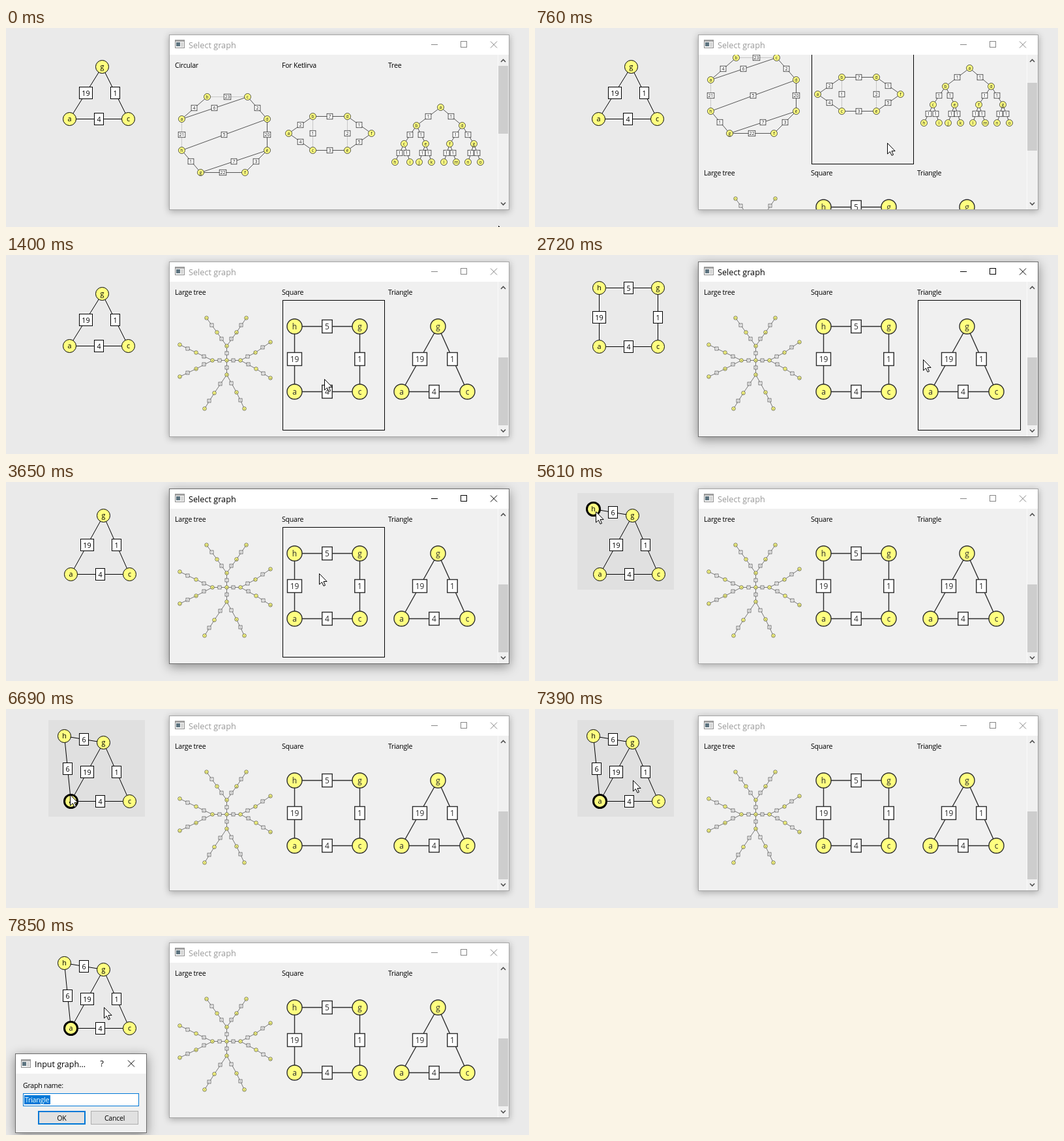
Write an HTML page with a canvas that moves like this. It is 802 px wide and 305 px high and loops after 7990 ms.

```html
<!DOCTYPE html>
<html lang="en">
<head>
<meta charset="utf-8">
<title>Select graph</title>
<style>
html, body { margin: 0; width: 100%; height: 100%; overflow: hidden; background: #eaeaea; }
canvas { display: block; }
</style>
</head>
<body>
<canvas id="stage" width="802" height="305"></canvas>
<script>
const ctx = document.getElementById('stage').getContext('2d');
const LOOP = 7990, TICK = 77.75;
const SANS = '"Open Sans", "Noto Sans", sans-serif';
const BLUE = '#0078d7';

// Edges are written as "from, to, weight"
const graph = (nodes, edges, style) => ({ nodes, edges: edges.split(' '), style });
const MAIN = { r: 10, font: 10.8, lw: 1, ink: '#000', w: 8, digit: 6, h: 18 };
const LARGE = { r: 11.5, font: 12, lw: 1.4, ink: '#2c2c2c', w: 9, digit: 6.5, h: 20 };
const SMALL = { r: 5, font: 7, lw: .75, ink: '#222', w: 7, digit: 1.8, h: 8.5 };
const TINY = { r: 2.8, font: 4, lw: .7, ink: '#444', w: 3.5, digit: 1.5, h: 5 };

const TRI = 'ga19 gc1 ac4', SQ = 'hg5 ha19 gc1 ac4';
const mainGraphs = {
  start: graph({ g: [147, 59], a: [97, 139], c: [187, 139] }, TRI, MAIN),
  square: graph({ h: [98, 50], g: [188, 50], a: [98, 140], c: [188, 140] }, SQ, MAIN),
  triangle: graph({ g: [149, 51], a: [99, 141], c: [189, 141] }, TRI, MAIN),
  added: graph({ g: [149, 51], a: [99, 141], c: [189, 141], h: [89, 41] }, TRI + ' gh6', MAIN),
  joined: graph({ g: [149, 51], a: [99, 141], c: [189, 141], h: [89, 41] }, TRI + ' gh6 ha6', MAIN)
};

function binaryTree() {
  const nodes = {
    a: [666, 121], b: [629, 149], d: [699, 149],
    c: [610, 177], e: [643, 177], f: [680, 177], g: [717, 177]
  };
  [596, 619, 633, 652, 671, 690, 708, 727].forEach((x, i) => nodes['hijklmno'[i]] = [x, 205]);
  return graph(nodes, 'ab1 ad1 bc1 be1 df1 dg1 ch1 ci1 ej1 ek1 fl1 fm1 gn1 go1', SMALL);
}

function starTree() {
  const nodes = {
    a: [338, 161], b: [338, 139], c: [359, 161], d: [338, 183], e: [316, 161],
    f: [323, 118], g: [353, 118], h: [382, 149], i: [383, 174],
    j: [319, 211], k: [353, 210], l: [291, 149], m: [291, 174],
    n: [307, 96], o: [368, 96], p: [405, 133], q: [405, 188],
    r: [304, 235], s: [365, 235], t: [266, 137], u: [266, 186]
  };
  const pairs = 'ab ac ad ae bf bg ch ci dj dk el em fn go hp iq jr ks lt mu';
  return graph(nodes, pairs.split(' ').map((p, i) => p + (i % 3 + 1)).join(' '), TINY);
}

const cells = [
  [
    { name: 'Circular', g: graph({
      a: [269, 139], b: [308, 105], c: [370, 105], d: [400, 139],
      e: [400, 187], f: [366, 221], g: [298, 221], h: [269, 187]
    }, 'ab4 ac6 bc23 cd2 ah21 dh5 de20 ef3 eg7 gf22 hg1', SMALL), faint: 'bc ah' },
    { name: 'For Ketlirva', g: graph({
      a: [433, 161], b: [470, 135], d: [523, 135],
      f: [560, 161], c: [470, 187], e: [523, 187]
    }, 'ab2 bd7 df1 ac4 bc1 de2 ce3 ef5', SMALL), faint: 'bc de' },
    { name: 'Tree', g: binaryTree() }
  ],
  [
    { name: 'Large tree', g: starTree() },
    { name: 'Square', g: graph({ h: [442, 109], g: [542, 109], a: [442, 209], c: [542, 209] }, SQ, LARGE) },
    { name: 'Triangle', g: graph({ g: [662, 109], a: [606, 209], c: [707, 209] }, TRI, LARGE) }
  ]
];
const COL_X = [260, 424, 587], ROW_H = 225;

// Pointer path: tick, x, y
const path = [
  [0, 755, 303], [1, 700, 265], [2, 600, 212], [3, 545, 184], [6, 545, 184], [8, 540, 176],
  [15, 540, 176], [18, 488, 190], [19, 488, 190], [22, 491, 164], [31, 491, 164],
  [35, 595, 160], [41, 670, 160], [43, 669, 161], [44, 669, 161], [47, 480, 140],
  [50, 210, 105], [52, 83, 75], [54, 149, 41], [55, 161, 46], [57, 161, 46],
  [58, 159, 53], [60, 150, 53], [64, 149, 53], [68, 93, 45], [73, 93, 45],
  [76, 112, 62], [78, 137, 95], [80, 120, 118], [82, 99, 128], [85, 99, 128],
  [86, 98, 131], [88, 84, 112], [90, 100, 68], [91, 120, 49], [93, 148, 82], [95, 150, 109]
];

function pointer(k) {
  const i = path.findIndex(p => p[0] > k);
  if (i < 0) return path[path.length - 1].slice(1);
  const [k0, x0, y0] = path[i - 1], [k1, x1, y1] = path[i];
  const f = (k - k0) / (k1 - k0);
  return [Math.round(x0 + (x1 - x0) * f), Math.round(y0 + (y1 - y0) * f)];
}

const scrollAt = k => k < 10 ? 0 : k < 14 ? Math.min(k - 9, 3) * 60 : ROW_H;

function mainState(k) {
  if (k < 25) return [mainGraphs.start];
  if (k < 43) return [mainGraphs.square];
  if (k < 71) return [mainGraphs.triangle, k >= 61 ? 'g' : ''];
  if (k < 83) return [mainGraphs.added, 'h'];
  return [mainGraphs.joined, 'a'];
}

function rect(x, y, w, h, fill, stroke, lw = 1) {
  if (fill) { ctx.fillStyle = fill; ctx.fillRect(x, y, w, h); }
  if (stroke) {
    ctx.strokeStyle = stroke;
    ctx.lineWidth = lw;
    ctx.strokeRect(x + lw / 2, y + lw / 2, w - lw, h - lw);
  }
}

function line(pts, color, lw = 1) {
  ctx.beginPath();
  pts.forEach(([x, y]) => ctx.lineTo(x, y));
  ctx.strokeStyle = color;
  ctx.lineWidth = lw;
  ctx.stroke();
}

function text(s, x, y, size, color = '#000', align = 'left', gap = 0) {
  ctx.font = `${size}px ${SANS}`;
  ctx.letterSpacing = gap + 'px';
  ctx.textAlign = align;
  ctx.fillStyle = color;
  ctx.fillText(s, x, y);
}
const label = (s, x, y, color, align) => text(s, x, y, 10.6, color, align, -.25);

function drawGraph({ nodes, edges, style: s }, picked = '', faint = '') {
  ctx.save();
  ctx.translate(.5, .5);
  for (const e of edges) {
    const dim = faint.includes(e.slice(0, 2));
    line([nodes[e[0]], nodes[e[1]]], dim ? '#bbb' : s.ink, s.lw);
  }
  for (const e of edges) {
    const [x0, y0] = nodes[e[0]], [x1, y1] = nodes[e[1]], weight = e.slice(2);
    const x = Math.floor((x0 + x1) / 2), y = Math.floor((y0 + y1) / 2);
    const w = s.w + s.digit * weight.length;
    ctx.fillStyle = '#fff';
    ctx.strokeStyle = s.ink;
    ctx.lineWidth = s.lw;
    ctx.fillRect(x - w / 2, y - s.h / 2, w, s.h);
    ctx.strokeRect(x - w / 2, y - s.h / 2, w, s.h);
    text(weight, x, y + s.font * .38, s.font, s.ink, 'center');
  }
  for (const id in nodes) {
    const [x, y] = nodes[id];
    ctx.beginPath();
    ctx.arc(x, y, s.r, 0, 7);
    ctx.fillStyle = '#ffff80';
    ctx.strokeStyle = s.ink;
    ctx.lineWidth = id === picked ? 3 : s.lw;
    ctx.fill();
    ctx.stroke();
    text(id, x, y + s.font * .36, s.font, s.ink, 'center');
  }
  ctx.restore();
}

function frame(x, y, w, h, active) {
  ctx.save();
  ctx.shadowColor = `rgba(0,0,0,${active ? .42 : .3})`;
  ctx.shadowBlur = active ? 16 : 10;
  ctx.shadowOffsetY = active ? 4 : 2;
  rect(x, y, w, h, '#f0f0f0');
  ctx.restore();
  rect(x, y, w, 31, '#fff');
  rect(x, y, w, h, null, active ? '#6c6c6c' : '#a6a6a6');
}

function appIcon(x, y) {
  rect(x, y, 15, 13, '#f4f4f4', '#8f8f8f');
  rect(x + 1, y + 1, 13, 2, '#a9a9a9');
  rect(x + 2, y + 4, 6, 6, '#5d7480');
  rect(x + 9, y + 4, 4, 7, '#d6d6d6');
}

function cross(x, y, color) {
  line([[x, y], [x + 10, y + 10]], color);
  line([[x + 10, y], [x, y + 10]], color);
}

function drawPicker(k, [px, py]) {
  const active = k >= 24 && k < 53, scroll = scrollAt(k);
  frame(250, 10, 522, 269, active);
  appIcon(259, 18);
  const ink = active ? '#000' : '#858585';
  text('Select graph', 280, 31, 12.7, active ? '#000' : '#999');
  line([[652, 25.5], [662, 25.5]], ink);
  rect(697, 20, 10, 10, null, ink);
  cross(743, 20.5, ink);

  ctx.save();
  ctx.beginPath();
  ctx.rect(251, 41, 520, 237);
  ctx.clip();
  ctx.translate(0, -scroll);
  const hoverRow = k < 16 ? 0 : 1;
  cells.forEach((row, r) => {
    ctx.save();
    ctx.translate(0, r * ROW_H);
    row.forEach((cell, c) => {
      label(cell.name, COL_X[c] - 1, 61);
      drawGraph(cell.g, '', cell.faint);
      const x = COL_X[c], w = c === 1 ? 157 : 158;
      const inside = px >= x && px < x + w && py >= 69 && py < 269;
      if (r === hoverRow && inside) rect(x, 69, w, 200, null, '#000');
    });
    ctx.restore();
  });
  ctx.restore();

  rect(754, 41, 1, 237, '#fafafa');
  rect(755, 41, 16, 237, '#f0f0f0');
  rect(755, 58 + Math.round(scroll * .44), 15, 104, '#cdcdcd');
  line([[759, 52], [762.5, 48.5], [766, 52]], '#505050', 1.6);
  line([[759, 267.5], [762.5, 271], [766, 267.5]], '#505050', 1.6);
}

function drawMain(k) {
  const [g, picked] = mainState(k);
  if (k >= 51 && k < 97) {
    const pts = Object.values(g.nodes);
    const xs = pts.map(p => p[0]), ys = pts.map(p => p[1]);
    const x = Math.min(...xs) - 24, y = Math.min(...ys) - 24;
    rect(x, y, Math.max(...xs) + 24 - x, Math.max(...ys) + 24 - y, '#e0e0e0');
  }
  drawGraph(g, picked);
}

function button(s, x, main) {
  rect(x, 268, 73, 21, '#e1e1e1', main ? BLUE : '#adadad', main ? 2 : 1);
  label(s, x + 36.5, 283, '#000', 'center');
}

function drawDialog(k) {
  if (k < 98) return;
  const p = Math.min(1, (k - 97) / 4), s = .9 + .1 * p;
  ctx.save();
  ctx.globalAlpha = p;
  ctx.translate(115, 241);
  ctx.scale(s, s);
  ctx.translate(-115, -241);
  frame(14, 180, 202, 122, true);
  appIcon(23, 189);
  text('Input graph...', 44, 201, 12.5);
  text('?', 147, 200, 13, '#000', 'center');
  cross(187, 190.5, '#000');
  label('Graph name:', 26, 233);
  rect(26, 241, 178, 20, '#fff', BLUE);
  rect(28, 244, 40, 14, BLUE);
  label('Triangle', 29, 255, '#fff');
  button('OK', 49, true);
  button('Cancel', 130, false);
  ctx.restore();
}

function drawPointer([x, y]) {
  const shape = [[0, 0], [0, 16.5], [4, 13], [6.5, 18.8], [9, 17.8], [6.5, 12], [11.6, 12]];
  ctx.beginPath();
  shape.forEach(([dx, dy]) => ctx.lineTo(x + .5 + dx, y + .5 + dy));
  ctx.closePath();
  ctx.fillStyle = '#fff';
  ctx.strokeStyle = '#000';
  ctx.lineWidth = 1;
  ctx.fill();
  ctx.stroke();
}

function draw(t) {
  const k = Math.floor((t + 20) / TICK), pos = pointer(k);
  rect(0, 0, 802, 305, '#eaeaea');
  drawMain(k);
  drawPicker(k, pos);
  drawDialog(k);
  drawPointer(pos);
}

const start = performance.now();
function loop() {
  draw((performance.now() - start) % LOOP);
  requestAnimationFrame(loop);
}
loop();
</script>
</body>
</html>
```
